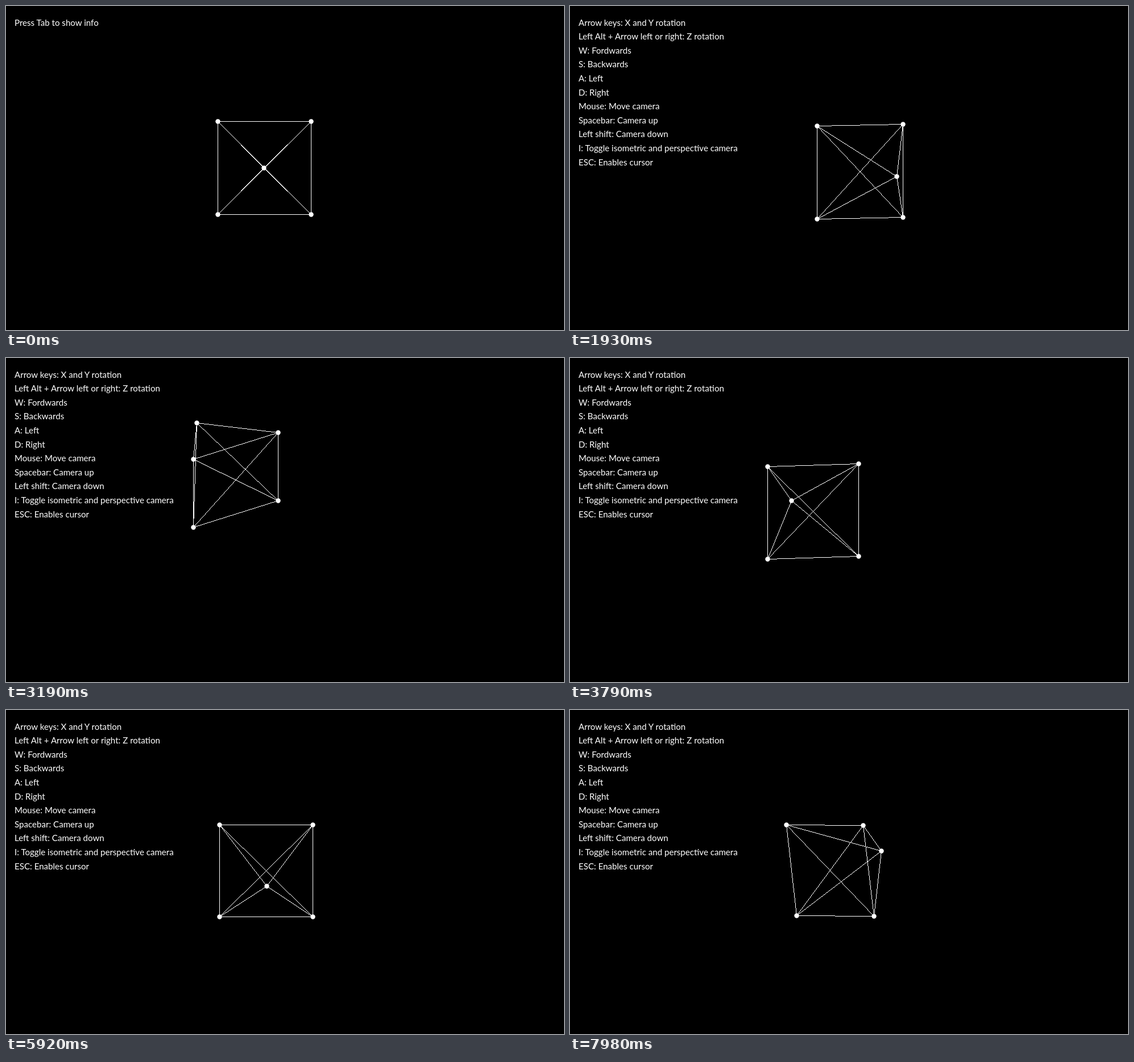
An HTML page with a canvas for the animation above (8000 ms loop, 981x571 px).

```html
<!DOCTYPE html>
<html lang="en">
<head>
<meta charset="utf-8">
<title>Wireframe pyramid</title>
<style>
  html, body { margin: 0; width: 100%; height: 100%; overflow: hidden; background: #000; }
  canvas { position: absolute; left: 0; top: 0; }
  pre {
    position: absolute; left: 15px; top: 16.7px; margin: 0; color: #fff;
    font: 400 15.1px/24.6px Lato, "Open Sans", sans-serif;
  }
</style>
</head>
<body>
<canvas id="stage" width="981" height="571"></canvas>
<pre id="hint">Press Tab to show info</pre>
<pre id="help" hidden>Arrow keys: X and Y rotation
Left Alt + Arrow left or right: Z rotation
W: Fordwards
S: Backwards
A: Left
D: Right
Mouse: Move camera
Spacebar: Camera up
Left shift: Camera down
I: Toggle isometric and perspective camera
ESC: Enables cursor</pre>
<script>
const LOOP = 8000, TICK = 66.5, TICK_LEAD = 12, HELP_TICK = 2;
const HALF = 82, HEIGHT = 164;
const PIVOT = { x: 493.6, y: 284.3 }; // point the camera turns around
const OFFSET = { x: -38, z: 131.2 };  // base centre relative to the pivot

const corners = [0, 1, 2, 3].map(i => [i % 2 ? HALF : -HALF, i < 2 ? -HALF : HALF, 0]);
const vertices = [...corners, [0, 0, HEIGHT]];

const linear = u => u;
const smooth = u => u * u * (3 - 2 * u);

// share of a move between two ticks that is done
const done = (tick, from, to, ease) => ease(Math.min(1, Math.max(0, (tick - from) / (to - from))));

// mouse gestures: smooth turns of the camera
function cameraPose(tick) {
  const sweep = (degrees, from, to) => degrees * done(tick, from, to, smooth);
  return {
    yaw: -.5 + sweep(56, 13, 23.8) + sweep(-101, 23.5, 38) + sweep(29, 39, 53) + sweep(17, 49.5, 76),
    pitch: .2 + sweep(3.8, 13, 23) + sweep(-2.6, 23, 38) + sweep(-49, 39, 50.2)
      + sweep(57, 50.2, 60.7) + sweep(-10.1, 61, 70)
  };
}

// held arrow keys: constant turns of the pyramid
function objectPose(tick) {
  const hold = (degrees, from, to) => degrees * done(tick, from, to, linear);
  return {
    tilt: hold(92.3, 88, 97) + hold(-104.1, 101, 111),
    turn: hold(33.7, 117, 120)
  };
}

function rotate(p, q, degrees) {
  const r = degrees * Math.PI / 180, c = Math.cos(r), s = Math.sin(r);
  return [p * c + q * s, q * c - p * s];
}

function project([x, y, z], object, camera) {
  [y, z] = rotate(y, z, object.tilt);
  [x, z] = rotate(x, z, object.turn);
  [x, z] = rotate(x + OFFSET.x, z + OFFSET.z, camera.yaw);
  [y] = rotate(y, z, camera.pitch);
  return [Math.round(PIVOT.x + x), Math.round(PIVOT.y + y)];
}

const ctx = document.getElementById("stage").getContext("2d");
const hint = document.getElementById("hint"), help = document.getElementById("help");

// one-pixel line without antialiasing
function line([x0, y0], [x1, y1]) {
  const steps = Math.max(Math.abs(x1 - x0), Math.abs(y1 - y0), 1);
  for (let i = 0; i <= steps; i++) {
    ctx.fillRect(Math.round(x0 + (x1 - x0) * i / steps), Math.round(y0 + (y1 - y0) * i / steps), 1, 1);
  }
}

function dot([x, y]) {
  ctx.beginPath();
  ctx.arc(x + .5, y + .5, 4.2, 0, 2 * Math.PI);
  ctx.fill();
}

function draw(tick) {
  const object = objectPose(tick), camera = cameraPose(tick);
  const points = vertices.map(v => project(v, object, camera));
  ctx.fillStyle = "#000";
  ctx.fillRect(0, 0, 981, 571);
  ctx.fillStyle = "#fff";
  // every vertex is joined to every other
  points.forEach((a, i) => points.slice(i + 1).forEach(b => line(a, b)));
  points.forEach(dot);
  hint.hidden = tick >= HELP_TICK;
  help.hidden = tick < HELP_TICK;
}

function frame() {
  const time = performance.now() % LOOP;
  draw(Math.floor((time + TICK_LEAD) / TICK));
  requestAnimationFrame(frame);
}
frame();
</script>
</body>
</html>
```
